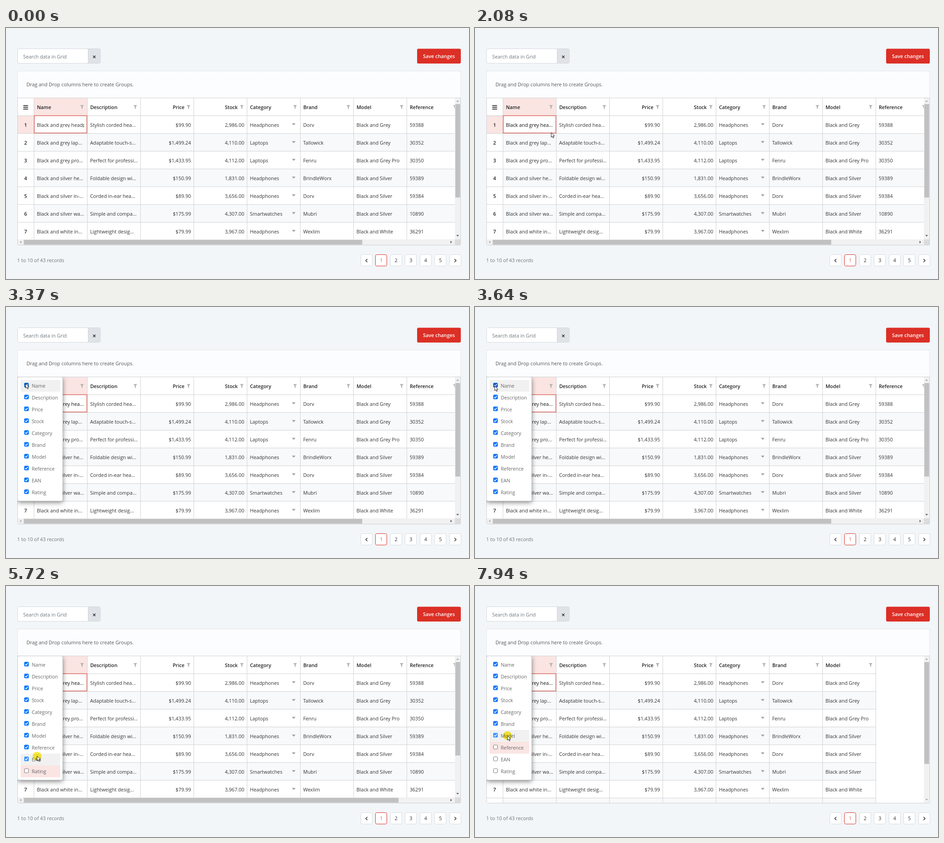
Animation of 1017x551 px, one loop 8000 ms. Source, as an HTML page with a canvas:

```html
<!DOCTYPE html>
<html lang="en">
<head>
<meta charset="utf-8">
<title>Product grid with column chooser</title>
<style>
  html, body { margin: 0; width: 100%; height: 100%; overflow: hidden; background: #f2f6f9; }
  canvas { display: block; }
</style>
</head>
<body>
<canvas id="stage" width="1017" height="551"></canvas>
<script>
const ctx = document.getElementById('stage').getContext('2d');
const LOOP = 8000;
const FONT = '"Open Sans", "Noto Sans", sans-serif';
const INK = '#333', LINE = '#d0d2d4', PINK = '#fae5e3', RED = '#dc2f26';
const TOP = 153, ROW = 39, LEFT = 25, FIRST = 61, COL = 117, RIGHT = 986;

const columns = ['Name', 'Description', 'Price', 'Stock', 'Category', 'Brand',
  'Model', 'Reference', 'EAN', 'Rating'];
const rows = [
  ['Black and grey hea...', 'Stylish corded hea...', '$99.90', '2,986.00', 'Headphones', 'Dorv', 'Black and Grey', '59388'],
  ['Black and grey lap...', 'Adaptable touch-s...', '$1,499.24', '4,110.00', 'Laptops', 'Tallowick', 'Black and Grey', '30352'],
  ['Black and grey pro...', 'Perfect for professi...', '$1,433.95', '4,112.00', 'Laptops', 'Fenru', 'Black and Grey Pro', '30350'],
  ['Black and silver he...', 'Foldable design wi...', '$150.99', '1,831.00', 'Headphones', 'BrindleWorx', 'Black and Silver', '59389'],
  ['Black and silver in-...', 'Corded in-ear hea...', '$89.90', '3,656.00', 'Headphones', 'Dorv', 'Black and Silver', '59384'],
  ['Black and silver wa...', 'Simple and compa...', '$175.99', '4,307.00', 'Smartwatches', 'Mubri', 'Black and Silver', '10890'],
  ['Black and white in...', 'Lightweight desig...', '$79.99', '3,967.00', 'Headphones', 'Wexlim', 'Black and White', '36291']
];

// Timeline in ms
const EDIT_END = 1280, MENU_OPEN = 3300;
const hideAt = { Rating: 4900, EAN: 5870, Reference: 6670 };
const presses = [[4840, 4900], [5580, 5870], [6540, 6670], [7880, LOOP]];
const flashes = [[1280, 1400], [1870, 1940], [3240, 3300], [4900, 4960],
  [5580, 5870], [6540, 6670], [7880, LOOP]];
const path = [ // time, x, y
  [530, 2, 171], [670, 47, 184], [870, 47, 184], [1000, 47, 174], [1940, 47, 174],
  [2140, 199, 244], [2480, 199, 244], [2680, 53, 186], [3100, 46, 172], [3240, 43, 166],
  [3300, 43, 167], [3640, 43, 173], [4100, 62, 176], [4840, 72, 402], [4960, 72, 402],
  [4970, 70, 383], [5040, 69, 383], [5110, 69, 380], [5250, 69, 379], [5310, 68, 373],
  [5870, 68, 373], [6280, 72, 351], [6670, 72, 351], [7150, 71, 328]
];

const within = (list, t) => list.some(([a, b]) => t >= a && t < b);
const lerp = (a, b, k) => a + (b - a) * k;

function cursorAt(t) {
  if (t < 140 || (t >= 270 && t < 530)) return null;
  if (t < 270) {
    const k = Math.min(1, (t - 140) / 60);
    return { x: lerp(638, 99, k), y: lerp(398, 225, k) };
  }
  const i = path.findIndex(p => p[0] > t);
  if (i < 0) {
    const [, x, y] = path[path.length - 1];
    return { x, y };
  }
  const [t0, x0, y0] = path[i - 1], [t1, x1, y1] = path[i];
  const u = (t - t0) / (t1 - t0), k = u * u * (3 - 2 * u);
  return { x: lerp(x0, x1, k), y: lerp(y0, y1, k) };
}

function rect(x, y, w, h, fill) {
  ctx.fillStyle = fill;
  ctx.fillRect(x, y, w, h);
}

function box(x, y, w, h, r, fill, stroke) {
  ctx.beginPath();
  ctx.roundRect(x, y, w, h, r);
  if (fill) { ctx.fillStyle = fill; ctx.fill(); }
  if (stroke) { ctx.strokeStyle = stroke; ctx.lineWidth = 1; ctx.stroke(); }
}

function text(str, x, y, color = INK, align = 'left', weight = 400) {
  ctx.font = `${weight} 10.8px ${FONT}`;
  ctx.textAlign = align;
  ctx.fillStyle = color;
  ctx.fillText(str, x, y);
}

function poly(points, fill) {
  ctx.beginPath();
  points.forEach(([x, y]) => ctx.lineTo(x, y));
  ctx.closePath();
  ctx.fillStyle = fill;
  ctx.fill();
}

function lines(points, color, width) {
  ctx.beginPath();
  points.forEach(([x, y], i) => i ? ctx.lineTo(x, y) : ctx.moveTo(x, y));
  ctx.strokeStyle = color;
  ctx.lineWidth = width;
  ctx.stroke();
}

// Small triangle pointing along (dx, dy)
function arrow(x, y, dx, dy, color, size = 3) {
  const h = size * 0.5;
  poly([[x + dx * h, y + dy * h],
    [x - dx * h + dy * size, y - dy * h + dx * size],
    [x - dx * h - dy * size, y - dy * h - dx * size]], color);
}

function drawPage() {
  rect(0, 0, 1017, 551, '#f2f6f9');

  box(25.5, 45.5, 182, 32, 3, '#fff', '#d5d8dd');
  box(180, 46, 27.5, 31, [0, 3, 3, 0], '#dfe2e7');
  lines([[180.5, 46], [180.5, 77]], '#d0d4d9', 1);
  text('Search data in Grid', 37.7, 67, '#6c757d');
  lines([[191.2, 60.7], [196.6, 66.1]], '#222', 1.3);
  lines([[196.6, 60.7], [191.2, 66.1]], '#222', 1.3);

  box(903, 45.5, 96, 32.5, 3, RED);
  text('Save changes', 951, 66, '#fff', 'center', 600);

  rect(25, 95, 974, 58, '#fcfdfe');
  ctx.setLineDash([2, 2]);
  lines([[25.5, 153], [25.5, 94.5], [998.5, 94.5], [998.5, 153]], '#d3d6d9', 1);
  ctx.setLineDash([]);
  text('Drag and Drop columns here to create Groups.', 45, 128, '#555');

  text('1 to 10 of 43 records', 24.6, 514, '#6c757d');
  for (let i = 0; i < 7; i++) {
    const x = 779 + 32.5 * i, mid = x + 12.9;
    box(Math.floor(x) + 0.5, 497.5, 25, 25, 3, '#fff', i === 1 ? RED : '#d8dbdf');
    if (i === 0 || i === 6) {
      const d = i ? 1.8 : -1.8;
      lines([[mid - d, 507], [mid + d, 510.5], [mid - d, 514]], '#222', 1.3);
    } else {
      text(String(i), mid, 514, i === 1 ? '#c9634f' : INK, 'center');
    }
  }
}

function drawFunnel(x, y) {
  poly([[x - 4, y - 4.5], [x + 4, y - 4.5], [x + 1.2, y - 0.8],
    [x + 1.2, y + 4.2], [x - 1.2, y + 2.4], [x - 1.2, y - 0.8]], '#b3b3b3');
}

function drawCell(str, c, r, t) {
  const x = FIRST + c * COL, y = TOP + ROW * (r + 1);
  const numeric = c === 2 || c === 3;
  if (r === 0 && c === 0 && t < EDIT_END) {
    ctx.save();
    ctx.beginPath();
    ctx.rect(x, y, 111, 26.5);
    ctx.clip();
    text('Black and grey headphones', x + 6.7, y + 25);
    ctx.restore();
    return;
  }
  const color = r === 0 && c === 0 ? '#111' : INK;
  text(str, numeric ? x + 111.3 : x + 6.7, y + 25, color, numeric ? 'right' : 'left');
  if (c === 4) poly([[x + 99, y + 17.3], [x + 107, y + 17.3], [x + 103, y + 21.8]], '#a0a0a0');
}

function drawGrid(t, count) {
  const wide = 36 + count * COL > RIGHT - LEFT;
  const bottom = wide ? 464 : 477;
  const shown = Math.min(count, 8);
  const edge = Math.min(RIGHT, FIRST + count * COL);

  ctx.save();
  ctx.beginPath();
  ctx.roundRect(LEFT, TOP, 974, 324, [0, 0, 3, 3]);
  ctx.clip();
  rect(LEFT, TOP, 974, 324, '#fff');

  ctx.save();
  ctx.beginPath();
  ctx.rect(LEFT, TOP, RIGHT - LEFT, bottom - TOP);
  ctx.clip();
  for (let r = 1; r < 8; r += 2) rect(FIRST, TOP + ROW * (r + 1), edge - FIRST, ROW, '#f7f9fb');
  rect(FIRST, TOP, COL, ROW, PINK);
  rect(LEFT, TOP + ROW, 36, ROW, PINK);
  for (let r = 1; r <= 8; r++) rect(LEFT, TOP + ROW * r, edge - LEFT, 1, LINE);
  for (let c = 0; c <= shown; c++) rect(FIRST + c * COL, TOP, 1, bottom - TOP, LINE);

  for (let i = 0; i < 3; i++) rect(38, 169.5 + i * 3.8, 10.5, 1.7, '#222');
  for (let c = 0; c < shown; c++) {
    const x = FIRST + c * COL, numeric = c === 2 || c === 3;
    text(columns[c], numeric ? x + 97 - (c === 2 ? 67 - 67 : 0) - 66.5 + 66.5 - 66 + 66 : x + 6.9,
      178, '#222', numeric ? 'right' : 'left', 600);
    drawFunnel(x + 106, 173.8);
  }
  rows.forEach((row, r) => {
    text(String(r + 1), 43.2, TOP + ROW * (r + 1) + 25, '#222', 'center', 600);
    for (let c = 0; c < shown; c++) drawCell(row[c], c, r, t);
  });
  ctx.strokeStyle = '#d5554b';
  ctx.lineWidth = 1.3;
  ctx.strokeRect(62, 192.5, 115.7, 38);
  ctx.restore();

  drawBars(count, wide, bottom);
  ctx.restore();

  box(25.5, 153.5, 973, 323, [0, 0, 3, 3], null, '#cfd1d3');
}

function drawBars(count, wide, bottom) {
  const view = bottom - TOP, track = view - 28;
  rect(RIGHT, TOP, 12.5, view, '#f1f1f1');
  rect(RIGHT + 1, 167, 10.5, track * view / (ROW * 11), '#c1c1c1');
  arrow(992, 160.5, 0, -1, '#a3a3a3');
  arrow(992, bottom - 8, 0, 1, wide ? '#505050' : '#a3a3a3');
  if (!wide) return;
  const span = RIGHT - LEFT;
  rect(LEFT, 464, span, 13, '#f1f1f1');
  rect(39, 465, 933 * span / (36 + count * COL), 10.5, '#c1c1c1');
  arrow(32, 470, -1, 0, '#a3a3a3');
  arrow(978, 470, 1, 0, '#505050');
  rect(RIGHT, 464, 13, 13, '#dcdcdc');
}

function drawCheckbox(x, y, checked, over, pressed) {
  if (!checked) {
    box(x + 0.5, y + 0.5, 9, 9, 2, '#fff', over ? '#4f4f4f' : '#767676');
    return;
  }
  box(x, y, 10, 10, 2, over ? (pressed ? '#3793ff' : '#005cc8') : '#0075ff');
  lines([[x + 2, y + 5.2], [x + 4.1, y + 7.3], [x + 8, y + 2.7]], '#fff', 1.5);
}

function drawMenu(t, cur, hidden) {
  ctx.save();
  ctx.beginPath();
  ctx.rect(LEFT, TOP, 974, 324);
  ctx.clip();
  ctx.shadowColor = 'rgba(0,0,0,.5)';
  ctx.shadowBlur = 11;
  ctx.shadowOffsetY = 3;
  box(26, 154, 98.5, 272, 3, '#fff');
  ctx.restore();
  box(25.5, 153.5, 99, 272.5, 3, '#fff', '#c6c8ca');

  const over = Math.floor((cur.y - 160) / 26);
  const focus = hidden.length ? hidden[hidden.length - 1] : 'Name';
  columns.forEach((name, i) => {
    const y = 160 + i * 26;
    if (i === over) rect(32, y, 87, 26, '#f1f1f1');
    else if (name === focus) rect(32, y, 87, 26, PINK);
    drawCheckbox(40, y + 6.5, !hidden.includes(name), i === over, within(presses, t));
    text(name, 56.4, y + 17, '#666');
  });
}

function drawCursor(t, cur) {
  if (within(flashes, t)) {
    ctx.save();
    ctx.globalCompositeOperation = 'multiply';
    ctx.beginPath();
    ctx.arc(cur.x + 0.3, cur.y + 0.5, 9.6, 0, Math.PI * 2);
    ctx.fillStyle = '#fbec38';
    ctx.fill();
    ctx.restore();
  }
  const hand = t < MENU_OPEN && cur.x > 36 && cur.x < 50 && cur.y > 164 && cur.y < 181;
  ctx.save();
  ctx.translate(cur.x, cur.y);
  const shape = new Path2D(hand
    ? 'M-1.5 0.6Q-.2 -1 1 .6V5.2Q2.4 4.3 3.2 5.6Q4.5 4.9 5.2 6.2Q6.8 5.9 6.9 7.6V10.2L5.6 12.6V14.2H-.6V12.8L-3.8 8.8Q-4 7 -2.6 7.4L-1.5 8.4Z'
    : 'M.3 .3V10.6L2.7 8.4L4.4 12.2L6 11.5L4.4 7.8H7.7Z');
  ctx.fillStyle = '#fff';
  ctx.fill(shape);
  ctx.strokeStyle = '#111';
  ctx.lineWidth = 0.9;
  ctx.lineJoin = 'round';
  ctx.stroke(shape);
  if (hand) {
    lines([[1, 5], [1, 7.5]], '#111', 0.7);
    lines([[3.2, 5.6], [3.2, 7.8]], '#111', 0.7);
    lines([[5.2, 6.2], [5.2, 8]], '#111', 0.7);
  }
  ctx.restore();
}

function draw(t) {
  const cur = cursorAt(t);
  const hidden = Object.keys(hideAt).filter(name => t >= hideAt[name]);
  drawPage();
  drawGrid(t, columns.length - hidden.length);
  if (t >= MENU_OPEN) drawMenu(t, cur, hidden);
  if (cur) drawCursor(t, cur);
}

const start = performance.now();
function tick() {
  draw((performance.now() - start) % LOOP);
  requestAnimationFrame(tick);
}
tick();
</script>
</body>
</html>
```
